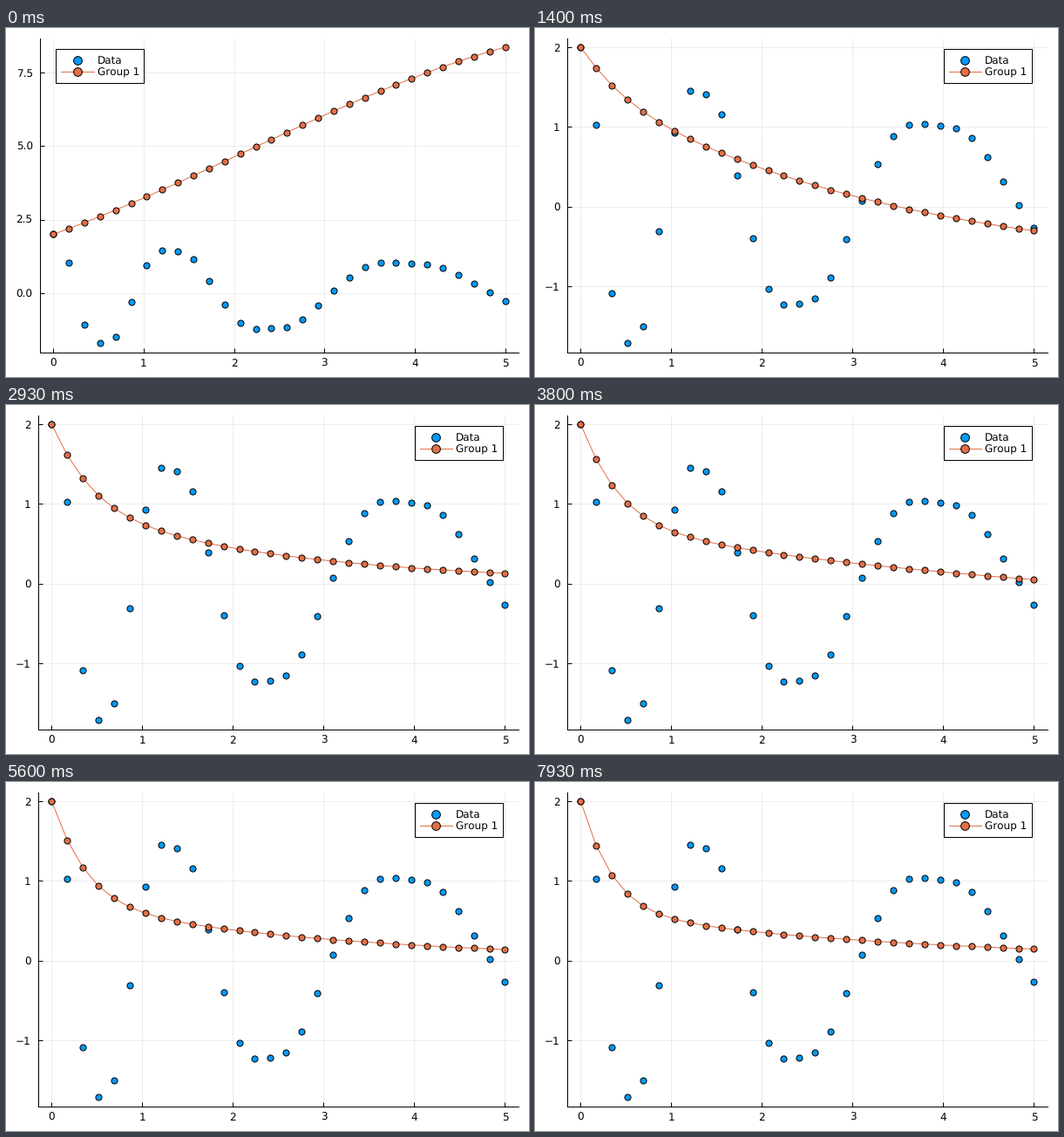
Recreate the animation shown at these times as a matplotlib script. Size 600 px wide and 400 px high, loop 8 s.

```python
import numpy as np
import matplotlib.pyplot as plt
from matplotlib.animation import FuncAnimation
from matplotlib.patches import Rectangle

W, H, DPI = 600, 400, 100
FRAMES, LOOP = 120, 8000
PX = 72 / DPI  # points per pixel
BLUE, ORANGE = "#009AFA", "#E36F47"
TOP, BOTTOM, RIGHT = 11.8, 371.5, 588.1

plt.rcParams["font.family"] = "DejaVu Sans"
plt.rcParams["font.size"] = 8.5
plt.rcParams["text.hinting"] = "none"
plt.rcParams["text.hinting_factor"] = 1

t = np.linspace(0, 5, 30)


def spiral(steps=40):
    """First component of the cubic spiral u' = A u^3, by Runge-Kutta."""
    A = np.array([[-0.1, -2], [2, -0.1]])
    slope = lambda u: A @ u ** 3
    h = (t[1] - t[0]) / steps
    u, path = np.array([2.0, 0.0]), [2.0]
    for _ in t[1:]:
        for _ in range(steps):
            a = slope(u)
            b = slope(u + h / 2 * a)
            c = slope(u + h / 2 * b)
            d = slope(u + h * c)
            u = u + h / 6 * (a + 2 * b + 2 * c + d)
        path.append(u[0])
    return np.array(path)


data = spiral()
rising = 2 + t * (1.352 - 0.024 * (t - 3.2) ** 2)
falling = 2 + t * (-0.86 + 0.056 * t)


def decay(i):
    """A fast and a slow decay whose rates drift as training goes on."""
    keys = [30, 57, 84, 105, 119]
    slow = np.interp(i, keys, [1.17, 0.8, 0.74, 0.65, 0.63])
    rate = np.interp(i, keys, [0.47, 0.33, 0.33, 0.29, 0.29])
    fast = 2.5 + 0.0088 * (i - 30)
    dip = 0.0041 * np.exp(-((i - 57) / 6) ** 2)
    return (slow * np.exp(-rate * t) - dip * t ** 2
            + (2 - slow) * 1.22 / (0.22 + np.exp(fast * t)))


def prediction(i):
    u = min(i / 12, 1)
    v = np.clip((i - 12) / 16, 0, 1)
    swing = u + u ** 2 - u ** 3
    ease = v * v * (3 - 2 * v)
    line = rising + (falling - rising) * swing
    return line + (decay(i) - line) * ease


def markers(color, size):
    return dict(marker="o", ms=size * PX, mfc=color, mec="black", mew=PX, snap=False)


fig = plt.figure(figsize=(W / DPI, H / DPI), dpi=DPI, facecolor="white")
ax = fig.add_axes([0, 0, 1, 1])
ax.spines[["top", "right"]].set_visible(False)
ax.spines[["left", "bottom"]].set_linewidth(PX)
ax.set_axisbelow(True)
ax.grid(color="black", alpha=0.07, lw=PX)
ax.tick_params(direction="in", length=4.8 * PX, width=PX)
ax.tick_params(axis="x", pad=7 * PX)
ax.tick_params(axis="y", pad=8 * PX)
ax.set_xlim(-0.15, 5.15)
ax.set_xticks(range(6))
ax.plot(t, data, ls="none", **markers(BLUE, 7.1))
fit, = ax.plot(t, data, color=ORANGE, lw=PX, **markers(ORANGE, 7.1))

# Legend on a pixel-sized layer
layer = fig.add_axes([0, 0, 1, 1])
layer.axis("off")
layer.set_xlim(0, W)
layer.set_ylim(H, 0)
box = layer.add_patch(Rectangle((0, 23.7), 101, 39, fc="white", ec="black", lw=PX))
bar, = layer.plot([0, 0], [49.7, 49.7], color=ORANGE, lw=PX)
dots = [layer.plot([0], [y], **markers(c, 9.7))[0]
        for y, c in ((36.9, BLUE), (49.7, ORANGE))]
names = [layer.text(0, y, s, va="baseline")
         for y, s in ((41.3, "Data"), (54.2, "Group 1"))]


def place_legend(x):
    box.set_x(x)
    bar.set_xdata([x + 6, x + 43.5])
    for dot in dots:
        dot.set_xdata([x + 24.5])
    for name in names:
        name.set_x(x + 47.5)


def draw(i):
    y = prediction(i)
    fit.set_ydata(y)
    low, high = min(data.min(), y.min()), max(data.max(), y.max())
    pad = 0.03 * (high - low)
    lo, hi = low - pad, high + pad

    if hi > 8.3:
        step, left, form = 2.5, 38.7, "%.1f"
    elif hi >= 6:
        step, left, form = 2, 28.3, "%d"
    else:
        step, left, form = 1, 36.7, "%d"
    ticks = np.arange(np.ceil(lo / step), np.floor(hi / step) + 1) * step + 0.0
    ax.set_position([left / W, 1 - BOTTOM / H, (RIGHT - left) / W, (BOTTOM - TOP) / H])
    ax.set_ylim(lo, hi)
    ax.set_yticks(ticks, [(form % v).replace("-", "\u2212") for v in ticks])

    inset = (RIGHT - left) / 30
    place_legend(left + inset if high > 2.05 else RIGHT - inset - 101)
    return []


anim = FuncAnimation(fig, draw, frames=FRAMES, init_func=lambda: draw(0),
                     interval=LOOP / FRAMES, repeat=True, repeat_delay=0, blit=False)
plt.show()
```
